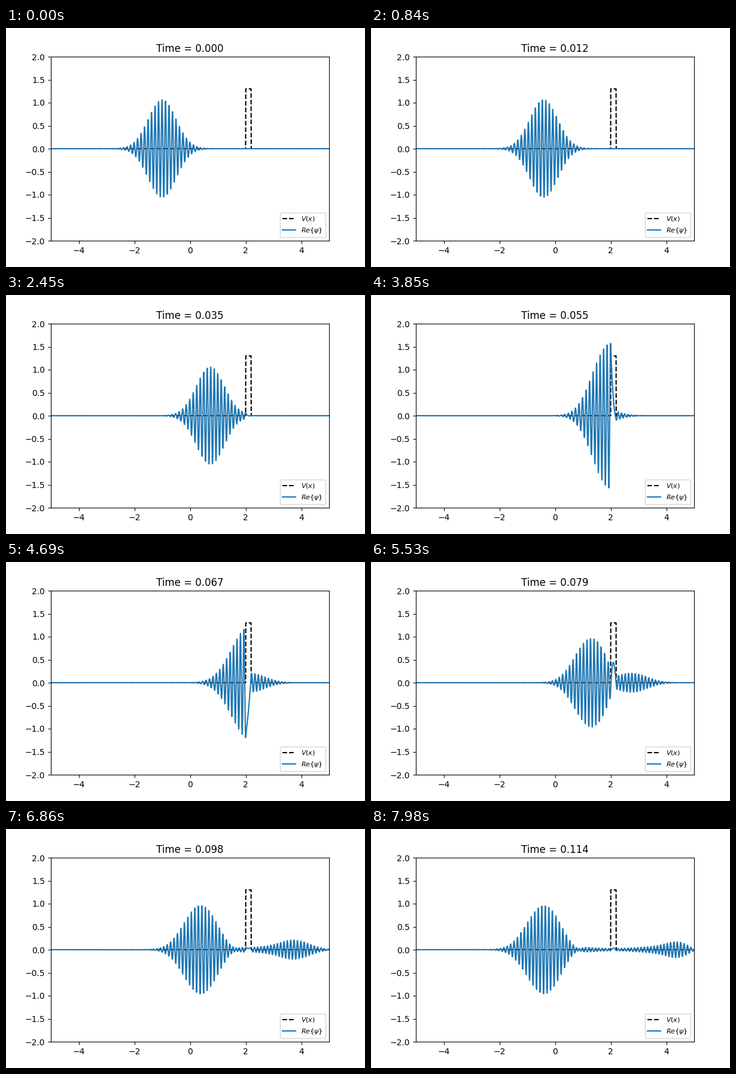
Animation of 600 by 400 pixels, one loop 8000 ms. Source, as a matplotlib script:

```python
import numpy as np
import matplotlib.pyplot as plt
from matplotlib.animation import FuncAnimation

# Gaussian wave packet hitting a thin barrier (hbar = m = 1)
DX = 0.005
K0, X0, SIGMA = 50, -1.0, 0.5
V0 = 1300
DT, STEPS = 0.001, 115
LOOP_MS, TICK_MS, STEP_MS = 8000, 20, 70

x = np.linspace(-5, 5, round(10 / DX) + 1)
V = np.where((x > 2 + DX / 2) & (x < 2.2 - DX / 2), V0, 0.0)
norm = 1 / np.sqrt(SIGMA * np.sqrt(np.pi))
psi0 = norm * np.exp(-(x - X0) ** 2 / (2 * SIGMA ** 2) + 1j * K0 * x)


def evolve():
    """Real part of psi at every time step, with hard walls at both ends."""
    n = len(x) - 2
    hop = np.full(n - 1, -0.5 / DX ** 2)
    H = np.diag(V[1:-1] + 1 / DX ** 2) + np.diag(hop, 1) + np.diag(hop, -1)
    E, U = np.linalg.eigh(H)
    c = U.T @ psi0.real[1:-1] + 1j * (U.T @ psi0.imag[1:-1])
    t = DT * np.arange(STEPS)
    modes = (c[:, None] * np.exp(-1j * np.outer(E, t))).real
    return np.pad((U @ modes).T, ((0, 0), (1, 1)))


waves = evolve()

fig, ax = plt.subplots(figsize=(6, 4), dpi=100)
ax.plot(x, V / 1000, "k--", label=r"$V(x)$")
line, = ax.plot(x, waves[0], color="tab:blue", label=r"$Re\{\psi\}$")
ax.set_xlim(-5, 5)
ax.set_ylim(-2, 2)
title = ax.set_title("Time = 0.000")
ax.legend(loc="lower right", fontsize=8)


def update(frame):
    step = min((frame * TICK_MS + TICK_MS // 2) // STEP_MS, STEPS - 1)
    line.set_ydata(waves[step])
    title.set_text(f"Time = {step * DT:.3f}")
    return line, title


anim = FuncAnimation(fig, update, frames=LOOP_MS // TICK_MS,
                     interval=TICK_MS, repeat=True, repeat_delay=0)
plt.show()
```
